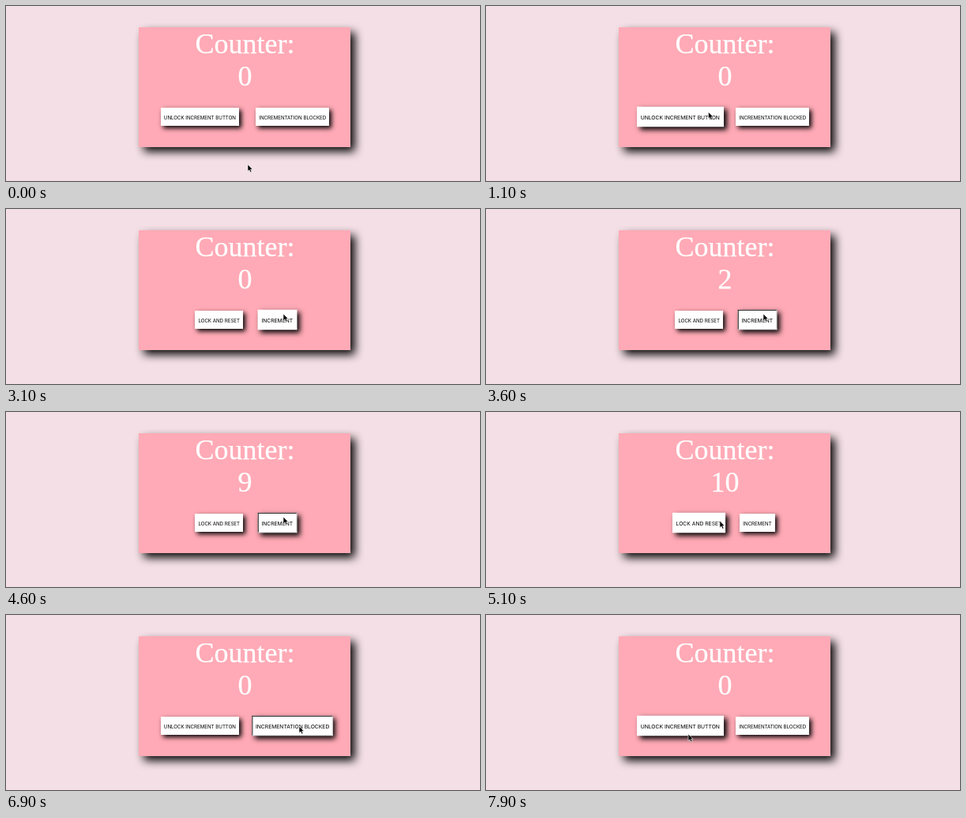
Recreate the animation shown at these times as an HTML page. Size 600 by 222 pixels, loop 8000 ms.

```html
<!DOCTYPE html>
<html lang="en">
<head>
<meta charset="utf-8">
<title>Counter</title>
<style>
  html, body { margin: 0; width: 100%; height: 100%; overflow: hidden; background: #f3dfe5; }
  #stage { position: relative; width: 600px; height: 222px; overflow: hidden; }
  #card, #row, #cursor { position: absolute; box-sizing: border-box; }
  #card {
    left: 168px; top: 27px; width: 268px; height: 152px; padding: 1px 0 0 1px;
    background: #ffaab6; box-shadow: 5.5px 5.5px 11px #000;
    color: #fff; -webkit-text-stroke: .25px #fff;
    font: 36px/41.4px "Liberation Serif", Times, serif; text-align: center;
  }
  #row { left: 168px; top: 129px; width: 269px; display: flex; justify-content: center; gap: 21px; }
  .button {
    box-sizing: border-box; height: 23px; padding: 0 3.2px;
    background: #fff; border: 1px solid #fff; box-shadow: 3.3px 3.3px 6px #000;
    color: #000; font: 6.15px/23px Inter, sans-serif; white-space: nowrap;
  }
  .button.hover { transform: scale(1.1); }
  .button.pressed { border-color: #333 #ddd #ddd #333; }
  #cursor { left: 0; top: 0; width: 10px; height: 14px; overflow: visible; }
</style>
</head>
<body>
<div id="stage">
  <div id="card">Counter:<div id="count">0</div></div>
  <div id="row"><div class="button"></div><div class="button"></div></div>
  <svg id="cursor"><path d="M0 0V8.6L2 6.9L3.4 10L5 9.3L3.6 6.3H6.2Z" stroke="#fff" stroke-width=".6"/></svg>
</div>
<script>
const LOOP = 8000, TICK = 100, MOVE = 500;
const UNLOCK = 1900, RESET = 5400, BLOCKED_PRESS = 6900;
const CLICK = 150, FIRST = 3400, LAST = 4700;

const home = { x: 306, y: 201 };
const moves = [
  { at: 0, x: 277, y: 155 },
  { at: 700, x: 282, y: 132 },
  { at: 2600, x: 351, y: 133 },
  { at: 4800, x: 266, y: 141 },
  { at: 6000, x: 371, y: 141 },
  { at: 7300, x: 256, y: 151 }
];

const locked = ["UNLOCK INCREMENT BUTTON", "INCREMENTATION BLOCKED"];
const open = ["LOCK AND RESET", "INCREMENT"];

const count = document.getElementById("count");
const cursor = document.getElementById("cursor");
const row = document.getElementById("row");
const buttons = [...row.children];

function pointerAt(t) {
  let { x, y } = home;
  for (const move of moves) {
    const k = Math.min(1, Math.max(0, (t - move.at) / MOVE));
    const eased = k * k * (3 - 2 * k);
    x += (move.x - x) * eased;
    y += (move.y - y) * eased;
  }
  return { x, y };
}

function countAt(t) {
  if (t < FIRST || t >= RESET) return 0;
  return Math.floor((Math.min(t, LAST + CLICK) - FIRST) / CLICK) + 1;
}

function isPressed(index, t) {
  if (index === 0) return t === RESET - TICK;
  const clicking = t >= FIRST - TICK && t <= LAST;
  return t === BLOCKED_PRESS || clicking && (t - FIRST + CLICK) % CLICK < TICK;
}

function isOver(button, { x, y }) {
  const dx = x - row.offsetLeft - (button.offsetLeft), dy = y - row.offsetTop;
  return dx > 0 && dx < button.offsetWidth && dy > 0 && dy < button.offsetHeight;
}

function draw(t) {
  const pointer = pointerAt(t);
  const labels = t >= UNLOCK && t < RESET ? open : locked;
  cursor.style.transform = `translate(${pointer.x}px, ${pointer.y}px)`;
  count.textContent = countAt(t);
  buttons.forEach((button, i) => button.textContent = labels[i]);
  buttons.forEach((button, i) => {
    button.classList.toggle("hover", isOver(button, pointer));
    button.classList.toggle("pressed", isPressed(i, t));
  });
}

const start = performance.now();
function frame() {
  const t = (performance.now() - start) % LOOP;
  draw(Math.floor(t / TICK) * TICK);
  requestAnimationFrame(frame);
}
frame();
</script>
</body>
</html>
```
